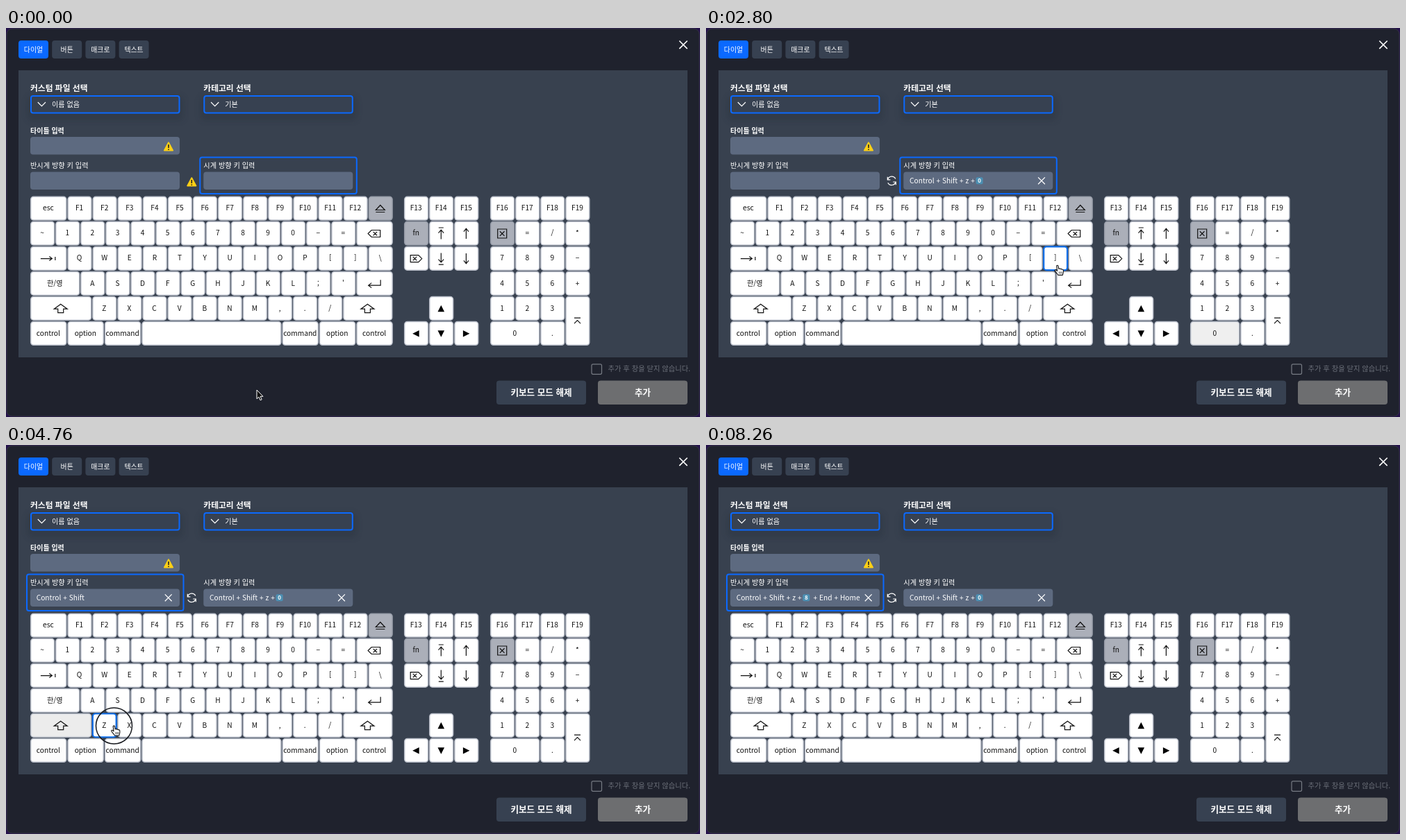
An HTML page that plays this animation: 999 px wide and 561 px high, repeating every 8.4 s.

```html
<!DOCTYPE html>
<html lang="ko">
<head>
<meta charset="utf-8">
<title>Key editor</title>
<style>
  html, body { margin: 0; width: 100%; height: 100%; overflow: hidden; background: #1f222d; }
  svg { display: block; width: 999px; height: 561px; }
  text { font-family: "Noto Sans CJK KR", "Noto Sans CJK", "Noto Sans", sans-serif; fill: #fff; white-space: pre; }
  .key rect { fill: #fff; stroke: #b9bec9; stroke-width: 1.5; }
  .key.off rect { fill: #abafb9; stroke: #949aa6; }
  .key.hover rect { stroke: #1070ec; stroke-width: 2.2; }
  .key text { fill: #111; font-size: 10.2px; text-anchor: middle; }
  .key path { fill: none; stroke: #111; stroke-width: 1.2; }
  .key path.solid { fill: #000; stroke: none; }
</style>
</head>
<body>
<svg id="stage" viewBox="0 0 999 561"></svg>
<script>
const NS = "http://www.w3.org/2000/svg";
const stage = document.getElementById("stage");
const LOOP = 8400, STEP = 70;
const BLUE = "#0b69ff";

function add(tag, attrs, parent = stage, content) {
  const el = document.createElementNS(NS, tag);
  for (const k in attrs) el.setAttribute(k, attrs[k]);
  if (content !== undefined) el.textContent = content;
  parent.appendChild(el);
  return el;
}
const group = (parent = stage) => add("g", {}, parent);
const box = (x, y, width, height, rx, fill, more, parent) =>
  add("rect", { x, y, width, height, rx, fill, ...more }, parent);
const label = (str, x, y, size, weight = 400, more, parent) =>
  add("text", { x, y, "font-size": size, "font-weight": weight, ...more }, parent, str);
const line = (d, stroke = "#fff", width = 1.2, parent = stage) =>
  add("path", { d, stroke, "stroke-width": width, fill: "none" }, parent);
const cross = (x, y, r, width, parent) =>
  line(`M${x - r} ${y - r}l${2 * r} ${2 * r}m0 ${-2 * r}l${-2 * r} ${2 * r}`, "#fff", width, parent);
const show = (el, on) => el.setAttribute("visibility", on ? "visible" : "hidden");
const middle = { "text-anchor": "middle" };

function warning(x, y, parent) {
  const g = add("g", { transform: `translate(${x} ${y})` }, parent);
  add("path", { d: "M0-6L6.3 5.6H-6.3Z", fill: "#fdcf16", stroke: "#fdcf16", "stroke-width": 1.6, "stroke-linejoin": "round" }, g);
  line("M0-3V2M0 3.4V5", "#222", 1.6, g);
}

// Window and panel
box(0, 0, 999, 561, 0, "#24124a");
box(1, 1, 997, 559, 8, "#1f222d", { stroke: "#343046", "stroke-width": 1 });
["다이얼", "버튼", "매크로", "텍스트"].forEach((name, i) => {
  const x = 18 + i * 48.2;
  box(x, 18, 43, 26, 4, i ? "#374151" : BLUE);
  label(name, x + 21.5, 34.6, 9.9, 500, middle);
});
cross(975, 24.2, 5.7, 1.6);
box(18, 61, 963, 414, 0, "#38414f");

// Dropdowns
const blur = add("filter", { id: "soft", x: "-20%", y: "-60%", width: "140%", height: "220%" }, add("defs", {}));
add("feGaussianBlur", { stdDeviation: 4 }, blur);
[[35, "커스텀 파일 선택", "이름 없음"], [284.3, "카테고리 선택", "기본"]].forEach(([x, title, value]) => {
  box(x - 5, 98, 226, 36, 8, "#1f2733", { opacity: .22, filter: "url(#soft)" });
  label(title, x, 91.4, 11.8, 700);
  box(x + 1, 98, 213.5, 24.5, 3, "#374151", { stroke: BLUE, "stroke-width": 2 });
  line(`M${x + 10.8} 107l5.6 5.6l5.6-5.6`);
  label(value, x + 31, 114, 10.1, 500);
});

// Input fields
label("타이틀 입력", 35, 151.6, 10, 700);
box(35, 157, 215, 25.5, 4, "#5d6a80");
warning(234, 171);

function makeField(x, title) {
  const ring = box(x - 5, 186.5, 225.5, 52.5, 3, "none", { stroke: BLUE, "stroke-width": 2 });
  label(title, x, 202.4, 10.2, 500);
  box(x, 207.5, 215, 25.5, 4, "#5d6a80");
  const text = label("", x + 8.7, 224, 10.2, 400);
  const cap = group();
  box(x + 104.3, 215.3, 10, 10, 2, "#4c8fb2", {}, cap);
  const digit = label("", x + 109.3, 223.2, 8, 700, middle, cap);
  const rest = label("", x + 119.5, 224, 10.2, 400);
  const clear = cross(x + 198.7, 220.3, 4.9, 1.3);
  return { ring, text, cap, digit, rest, clear };
}
const left = makeField(35, "반시계 방향 키 입력");
const right = makeField(284.3, "시계 방향 키 입력");
const caret = line("M44.5 212.5V228.5", "#fff", 1.2);

const alertIcon = group();
warning(267.3, 222, alertIcon);
const swapIcon = group();
line("M261.6 218.6A6 6 0 0 1 272.8 217.6M273 222A6 6 0 0 1 261.8 223.2M261.3 214.7V218.8H265.4M273.3 226.2V222H269.2", "#fff", 1.2, swapIcon);

// Footer
box(843, 484.8, 14.5, 14.5, 2, "none", { stroke: "#777b84", "stroke-width": 1.2 });
label("추가 후 창을 닫지 않습니다.", 866.5, 495.4, 10.3, 400, { style: "fill:#6c707a" });
box(706, 508.5, 129, 34.5, 4, "#374151");
label("키보드 모드 해제", 770.5, 530.2, 12.6, 700, middle);
box(852, 508.5, 129, 34.5, 4, "#6d6e70");
label("추가", 916.5, 530.2, 12.6, 700, middle);

// Key icons, drawn around the key's centre
const ICONS = {
  eject: "M-6.5 2L0-5L6.5 2ZM-6.5 5H6.5",
  back: "M-9 0L-4-5H8.5V5H-4ZM-1.5-2.7L4 2.7M4-2.7L-1.5 2.7",
  del: "M8.5 0L3.5-5H-8V5H3.5ZM-4.5-2.7L1 2.7M1-2.7L-4.5 2.7",
  tab: "M-11 0H5M1.5-3L5.5 0L1.5 3M10-2.5V2.5",
  enter: "M9-5.5V2.5H-8M-4-1L-8.5 2.5L-4 6",
  shift: "M0-6.5L9.5.5H4V6H-4V.5H-9.5Z",
  home: "M-3.5-8.5H3.5M0 8V-5M-3.8-1L0-5.3L3.8-1",
  end: "M-3.5 8.5H3.5M0-8V5M-3.8 1L0 5.3L3.8 1",
  pgup: "M0 7.5V-7M-3.5-2.8L0-7.3L3.5-2.8",
  pgdn: "M0-7.5V7M-3.5 2.8L0 7.3L3.5 2.8",
  clear: "M-6.5-6.5H6.5V6.5H-6.5ZM-3.3-3.3L3.3 3.3M3.3-3.3L-3.3 3.3",
  numenter: "M-4.5-4.5H4.5M-4.5 3.5L0-1L4.5 3.5",
  up: "M0-5L4.8 4.5H-4.8Z",
  down: "M0 5L4.8-4.5H-4.8Z",
  left: "M-5 0L4.5-4.8V4.8Z",
  right: "M5 0L-4.5-4.8V4.8Z"
};
const U = 36.1, TOP = 243.3;
const keys = [];

function addKey(name, x, row, w = 1, h = 1) {
  const y = TOP + row * 36.05, kw = w * U - 2.3, kh = h * 36.05 - 2.3;
  const g = group();
  const off = ["eject", "fn", "clear"].includes(name);
  g.setAttribute("class", off ? "key off" : "key");
  const rect = box(x + .7, y, kw, kh, 4, "#fff", {}, g);
  const cx = x + .3 + kw / 2, cy = y + kh / 2;
  if (ICONS[name]) {
    const solid = ["up", "down", "left", "right"].includes(name);
    add("path", { d: ICONS[name], class: solid ? "solid" : "", transform: `translate(${cx} ${cy + .3})` }, g);
  } else label(name, cx, cy + 3.2, 10.2, 400, {}, g);
  keys.push({ name, x, y, w: kw + 1, h: kh, g, rect, off });
}

// Each row: names split by spaces, "name:width" for wide keys, "_" for a gap
function addRows(x0, rows) {
  rows.forEach((row, r) => {
    let x = x0;
    row.split(" ").filter(Boolean).forEach(item => {
      const [name, w = 1, h = 1] = item.length > 1 ? item.split("|") : [item];
      if (name !== "_") addKey(name === "space" ? "" : name, x, r, +w, +h);
      x += w * U;
    });
  });
}
addRows(35, [
  "esc|1.48 F1 F2 F3 F4 F5 F6 F7 F8 F9 F10 F11 F12 eject",
  "~ 1 2 3 4 5 6 7 8 9 0 − = back|1.48",
  "tab|1.48 Q W E R T Y U I O P [ ] \\",
  "한/영|2 A S D F G H J K L ; ' enter|1.48",
  "shift|2.47 Z X C V B N M , . / shift|2",
  "control|1.48 option|1.48 command|1.48 space|5.6 command|1.48 option|1.48 control|1.48"
]);
addRows(573, ["F13 F14 F15", "fn home pgup", "del end pgdn", "", "_ up _", "left down right"]);
addRows(697, ["F16 F17 F18 F19", "clear = / *", "7 8 9 −", "4 5 6 +", "1 2 3 numenter|1|2", "0|2 ."]);

const keyAt = (x, y) => keys.find(k => x >= k.x && x < k.x + k.w && y >= k.y - .7 && y < k.y + k.h + .7);

// Pointer path: time, x, y
const PATH = [
  [0, 361, 522], [140, 361, 522], [700, 64, 440], [910, 64, 440], [1120, 82, 407], [1260, 82, 407],
  [1450, 145, 406], [1600, 146, 406], [1960, 754, 391], [2240, 735, 434], [2450, 735, 434],
  [3220, 205, 222], [3400, 205, 222], [3500, 208, 231], [3900, 64, 440], [4080, 64, 440],
  [4300, 82, 407], [4450, 82, 407], [4690, 155.5, 405], [4900, 155.5, 405],
  [5480, 757, 341], [5720, 757.5, 341], [6350, 622, 330], [6520, 622, 330], [6720, 624, 316],
  [6920, 627, 298], [7140, 627, 298], [7630, 615, 522], [8050, 608, 552], [8190, 606, 580], [8400, 606, 580]
];
const CLICKS = [850, 1230, 1550, 2380, 3360, 4030, 4410, 4800, 5640, 6490, 7060];

function pointer(t) {
  const i = Math.max(1, PATH.findIndex(p => p[0] > t));
  const [t0, x0, y0] = PATH[i - 1], [t1, x1, y1] = PATH[i];
  const p = (t - t0) / (t1 - t0), e = p * p * (3 - 2 * p);
  return [x0 + (x1 - x0) * e, y0 + (y1 - y0) * e];
}
const hits = CLICKS.map(time => {
  const [x, y] = pointer(time);
  return { time, x, y, key: keyAt(x, y) };
});

// Field contents: time, text, keycap digit, text after it
const RIGHT = [[0, ""], [850, "Control"], [1230, "Control + Shift"], [1550, "Control + Shift + z"], [2380, "Control + Shift + z +", "0"]];
const LEFT = [[0, ""], [4030, "Control"], [4410, "Control + Shift"], [4800, "Control + Shift + z"],
  [5640, "Control + Shift + z +", "8"], [6490, "Control + Shift + z +", "8", "+ End"], [7060, "Control + Shift + z +", "8", "+ End + Home"]];

function fill(field, states, t) {
  const [, text, digit = "", rest = ""] = states.filter(s => s[0] <= t).pop();
  field.text.textContent = text;
  field.digit.textContent = digit;
  field.rest.textContent = rest;
  show(field.cap, digit);
  show(field.clear, text);
  return text;
}

// Click marks and pointers
const disc = add("circle", { fill: "#777", opacity: .45 });
const ring = add("circle", { r: 26, fill: "none", stroke: "#15171c", "stroke-width": 1.5 });
const arrow = add("path", { d: "M0 0V12.8L2.9 10.1L5 14.8L7.2 13.8L5.1 9.3H9Z", fill: "#111", stroke: "#fff", "stroke-width": 1 });
const hand = group();
add("path", {
  d: "M-1.3.9C-1.3-.5.9-.5 1 .9L1.7 4.9C2.4 4 3.6 4.2 3.9 5.2C4.8 4.6 5.8 4.9 6 5.8C7.4 5.3 8.3 6.2 8.4 7.4C8.7 9.5 8.2 11.2 7.3 14H1C0 12.2-2.6 9.6-3.7 7.7C-4.2 6.3-2.6 5.7-1.5 6.9L-.5 8Z",
  fill: "#fff", stroke: "#111", "stroke-width": 1.1, "stroke-linejoin": "round"
}, hand);
line("M2.4 9V12M4.3 9V12M6.1 9V12", "#111", .7, hand);

function draw(t) {
  const [x, y] = pointer(t);
  const over = keyAt(x, y);
  const hot = over && !over.off ? over : null;

  for (const k of keys) {
    k.g.classList.toggle("hover", k === hot);
    const hit = hits.filter(h => h.key === k && t >= h.time && t < h.time + 800).pop();
    const shade = hit && k !== hot ? Math.round(255 - 34 * (1 - (t - hit.time) / 800)) : 255;
    k.rect.style.fill = hit ? `rgb(${shade},${shade},${shade})` : "";
  }
  if (hot) hot.g.parentNode.insertBefore(hot.g, disc);

  const onLeft = t >= 3360;
  show(left.ring, onLeft);
  show(right.ring, !onLeft);
  const typed = fill(left, LEFT, t);
  const any = fill(right, RIGHT, t);
  show(caret, onLeft && !typed);
  show(alertIcon, !any);
  show(swapIcon, any);

  const hit = hits.find(h => t >= h.time - 80 && t < h.time + 350);
  const age = hit ? t - hit.time : 999;
  show(ring, age < 120);
  show(disc, age >= 120 && age < 350);
  if (hit) {
    for (const c of [ring, disc]) {
      c.setAttribute("cx", hit.x);
      c.setAttribute("cy", hit.y);
    }
    disc.setAttribute("r", Math.max(0, 14 * (350 - age) / 230));
  }
  show(hand, hot);
  show(arrow, !hot);
  (hot ? hand : arrow).setAttribute("transform", `translate(${x} ${y})`);
}

const start = performance.now();
function tick() {
  const t = (performance.now() - start) % LOOP;
  draw(Math.floor(t / STEP) * STEP);
  requestAnimationFrame(tick);
}
tick();
</script>
</body>
</html>
```
